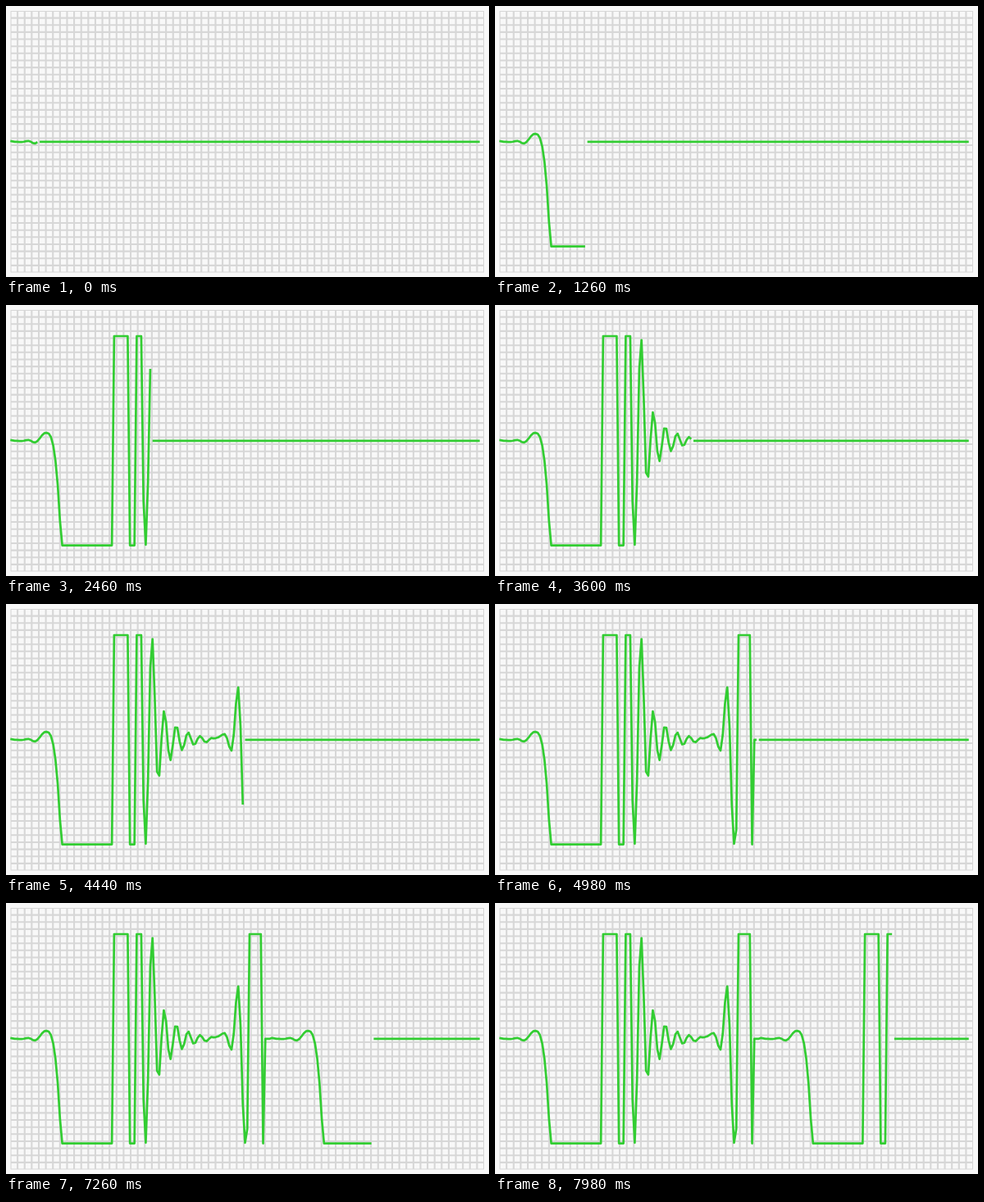
Write an HTML page that moves like this. It is 589x331 px and loops after 8 s.

```html
<!DOCTYPE html>
<html lang="en">
<head>
<meta charset="utf-8">
<title>Pulse monitor</title>
<style>
  html, body { margin: 0; width: 100%; height: 100%; overflow: hidden; background: #f8f8f8; }
  svg { display: block; width: 100%; height: 100%; }
  #grid { stroke: #d7d7d7; stroke-width: 2.1; fill: none; }
  .trace { stroke: #32cd32; stroke-width: 2.7; stroke-linejoin: round; fill: none; }
</style>
</head>
<body>
<svg viewBox="0 0 589 331">
  <clipPath id="sheet"><rect x="5.5" y="6" width="577.5" height="319.5"/></clipPath>
  <path id="grid" clip-path="url(#sheet)"/>
  <path id="wave" class="trace"/>
  <path id="rest" class="trace"/>
</svg>
<script>
const LOOP = 8000, TICK = 60;
const LEFT = 5.3, STEP = 2.752, LAST = 208;
const MID = 165.8, LIMIT = 127.8, PERIOD = 116;
const FIRST = 12.88, SPEED = 1.2185; // samples at the start, samples per tick
const GRID = { x: 5.5, y: 6, cols: 67, rows: 37, w: 8.62, h: 8.635 };

// Turning points of the signal: sample, offset below the middle line
const lead = [[0, -1], [2, 0], [5, 0.3], [8, -1], [10.8, 2.1], [15.7, -9.7]];
const swing = [[59, 74], [60, 127], [62.7, -LIMIT], [65.5, 45]];
const spike = [
  [91, -2], [95, -7], [98, 13.3], [101, -64], [104, 127], [105, 110],
  [106, -LIMIT], [111, -LIMIT], [112, LIMIT], [113, 0], [PERIOD, 0]
];
const flips = [45.5, 52.5, 55.5];

const $ = id => document.getElementById(id);
const sampleX = n => LEFT + STEP * n;

function ease(keys, n) {
  const i = Math.max(1, keys.findIndex(key => key[0] >= n));
  const [n0, y0] = keys[i - 1], [n1, y1] = keys[i];
  return y0 + (y1 - y0) * (1 - Math.cos(Math.PI * (n - n0) / (n1 - n0))) / 2;
}

const plunge = n => 0.43 * (n - 15.7) ** 3 - 9.7;
const square = n => LIMIT * (-1) ** flips.filter(flip => flip < n).length;
const ring = n => 50 * Math.exp(-0.13 * (n - 65.65)) * Math.cos(Math.PI * (n - 65.65) / 2.64);

function offset(n) {
  if (n < 15.7) return ease(lead, n);
  if (n < 23) return plunge(n);
  if (n < 59) return square(n);
  if (n < 65) return ease(swing, n);
  if (n < 91) return ring(n);
  return ease(spike, n);
}

function drawGrid({ x, y, cols, rows, w, h }) {
  let d = "";
  for (let c = 0; c <= cols; c++) d += `M${x + c * w} ${y}v${rows * h}`;
  for (let r = 0; r <= rows; r++) d += `M${x} ${y + r * h}h${cols * w}`;
  $("grid").setAttribute("d", d);
}

function render(ms) {
  const tick = Math.floor((ms % LOOP) / TICK);
  const tip = Math.floor(FIRST + SPEED * tick);
  const points = [];
  for (let n = 0; n <= tip; n++) {
    points.push(`${sampleX(n).toFixed(2)} ${(MID + offset(n % PERIOD)).toFixed(2)}`);
  }
  $("wave").setAttribute("d", "M" + points.join("L"));
  $("rest").setAttribute("d", `M${sampleX(tip + 1)} ${MID}H${sampleX(LAST)}`);
}

drawGrid(GRID);
render(0);
const start = performance.now();
(function loop() {
  render(performance.now() - start);
  requestAnimationFrame(loop);
})();
</script>
</body>
</html>
```
